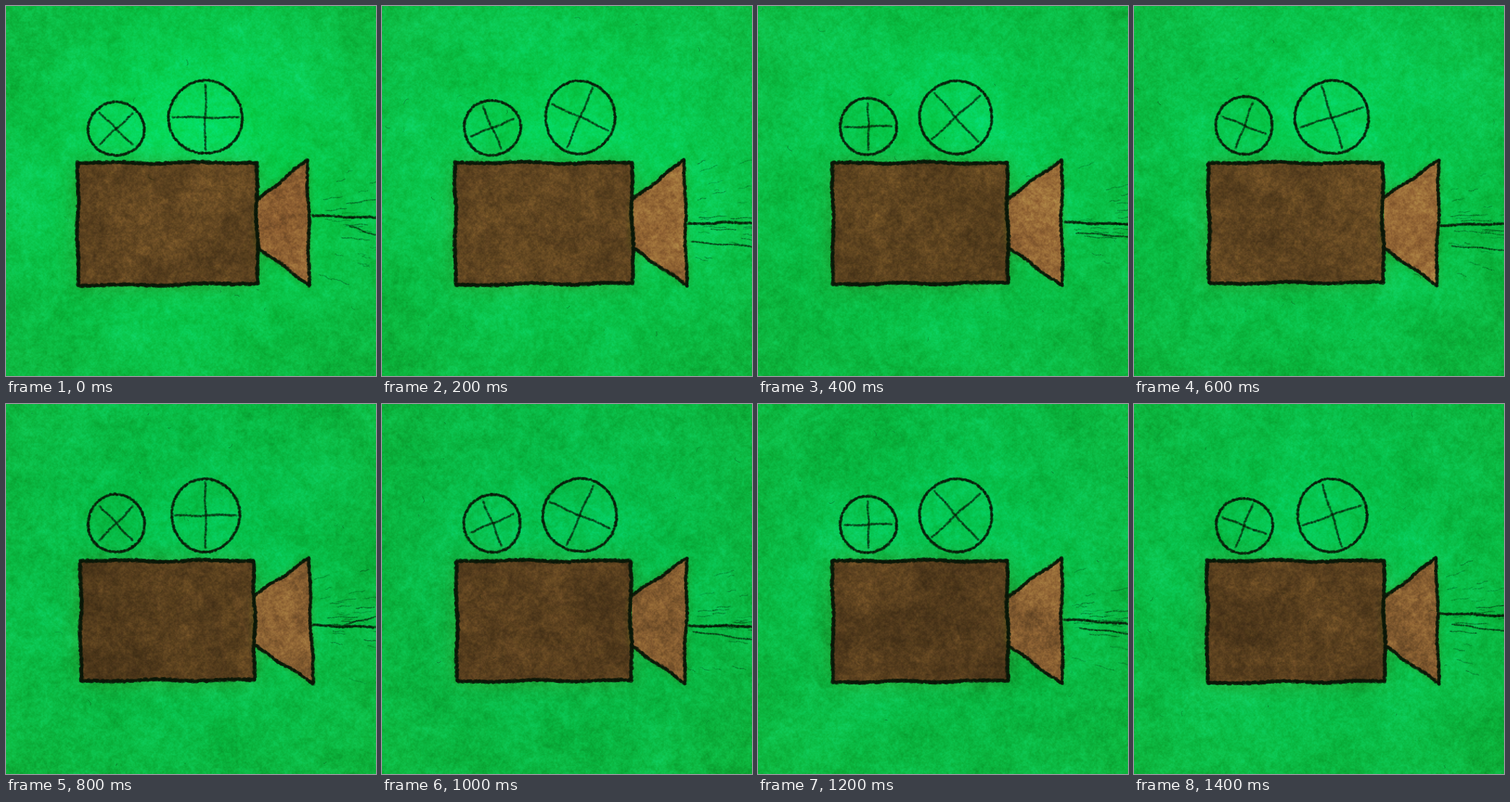
An HTML page with a canvas that plays this animation: 512x512 px, repeating every 1600 ms.

```html
<!DOCTYPE html>
<html lang="en">
<head>
<meta charset="utf-8">
<title>Hand-drawn film camera</title>
<style>
html, body { margin: 0; width: 100%; height: 100%; overflow: hidden; background: #0bbf55; }
canvas { display: block; width: 100vw; height: 100vh; }
</style>
</head>
<body>
<canvas id="stage" width="512" height="512"></canvas>
<script>
const SIZE = 512, HOLD = 200, POSES = 8;
const TAU = Math.PI * 2;
const INK = '11,24,9';
const screen = document.getElementById('stage').getContext('2d');

// Per pose: brightness of the green and of the cut-outs
const greens = [216, 210, 207, 206, 197, 192, 196, 199];
const glow = [1, .97, .98, 1, .88, .9, .9, .9];

// Per pose: main beam y from lens to edge, then a second beam as x, y, edge y
const beams = [
  [290, 293, 476, 305, 317],
  [301, 300, 428, 326, 333],
  [299, 302, 440, 314, 319],
  [304, 301, 440, 332, 338],
  [306, 309, 468, 306, 294],
  [307, 308, 430, 315, 326],
  [298, 304, 445, 310, 318],
  [290, 293, 440, 305, 314]
];

// Five drawings, played forward and back
function drawing(s) {
  const left = 99 + Math.min(s * 2, 4), low = Math.min(s, 3);
  const tipTop = [417, 418, 420, 422, 419][s], tipEnd = [420, 422, 421, 419, 425][s];
  return {
    body: [left, 217, 347 - s, 217, 348 - s, 384 - s * .6, left + 1, 387 - s],
    lens: [348 - s * .7, 268 - s, tipTop, 213, tipEnd, 387, 348 - s * .9, 334],
    small: [152.5, 170 - low * 1.6, 39, 37 + low],
    large: [[276, 274, 274, 274, 276][s], 154, [51, 48, 50, 51, 47][s], 50.5]
  };
}

function seeded(seed) {
  let s = seed * 7919 + 17 | 0;
  return () => {
    s = s + 0x6D2B79F5 | 0;
    let t = Math.imul(s ^ s >>> 15, 1 | s);
    t = t + Math.imul(t ^ t >>> 7, 61 | t) ^ t;
    return ((t ^ t >>> 14) >>> 0) / 4294967296;
  };
}

function newCanvas(n) {
  const c = document.createElement('canvas');
  c.width = c.height = n;
  return c;
}

const rgb = (c, k = 1) => `rgb(${c.map(v => Math.round(v * k)).join()})`;

function grain(ctx, rnd, cell) {
  const n = Math.ceil(SIZE / cell) + 2, tile = newCanvas(n), t = tile.getContext('2d');
  const img = t.createImageData(n, n);
  for (let i = 0; i < img.data.length; i += 4) {
    img.data.fill(rnd() * 256, i, i + 3);
    img.data[i + 3] = 255;
  }
  t.putImageData(img, 0, 0);
  ctx.save();
  ctx.globalAlpha = .11;
  ctx.globalCompositeOperation = 'overlay';
  ctx.imageSmoothingQuality = 'high';
  ctx.drawImage(tile, -cell, -cell, n * cell, n * cell);
  ctx.restore();
}

// Charcoal: overlapping dabs with a ragged edge along at(t), t from 0 to 1
function charcoal(ctx, rnd, at, length, width, alpha) {
  const steps = Math.ceil(length * 1.6);
  for (let i = 0; i <= steps; i++) {
    const [x, y] = at(i / steps);
    const r = width * (.26 + rnd() * .2), spread = width * .4;
    ctx.fillStyle = `rgba(${INK},${alpha * (.45 + rnd() * .55)})`;
    ctx.beginPath();
    ctx.arc(x + (rnd() - .5) * spread, y + (rnd() - .5) * spread, r, 0, TAU);
    ctx.fill();
  }
}

function line(ctx, rnd, x1, y1, x2, y2, width, alpha, bow = 1) {
  const dx = x2 - x1, dy = y2 - y1, length = Math.hypot(dx, dy);
  const phase = rnd() * TAU, waves = 5 + length / 30;
  const at = t => {
    const off = bow * Math.sin(phase + t * waves) * Math.sin(t * Math.PI);
    return [x1 + dx * t - dy / length * off, y1 + dy * t + dx / length * off];
  };
  charcoal(ctx, rnd, at, length, width, alpha);
}

function outline(ctx, rnd, p, sides, width) {
  for (let i = 0; i < sides * 2; i += 2)
    line(ctx, rnd, p[i], p[i + 1], p[(i + 2) % 8], p[(i + 3) % 8], width, .7, 1.4);
}

function polygon(ctx, p, fill, halo) {
  ctx.save();
  ctx.shadowColor = 'rgba(70,105,15,.55)';
  ctx.shadowBlur = halo;
  ctx.beginPath();
  for (let i = 0; i < p.length; i += 2) ctx.lineTo(p[i], p[i + 1]);
  ctx.fillStyle = fill;
  ctx.fill();
  ctx.restore();
}

function reel(ctx, rnd, [cx, cy, rx, ry], degrees, reach) {
  const phase = rnd() * TAU;
  const at = t => {
    const a = t * TAU, k = 1 + .012 * Math.sin(3 * a + phase);
    return [cx + rx * k * Math.cos(a), cy + ry * k * Math.sin(a)];
  };
  charcoal(ctx, rnd, at, Math.PI * (rx + ry), 4.6, .6);
  for (const turn of [0, 90]) {
    const a = (degrees + turn) * Math.PI / 180;
    const x = rx * reach * Math.cos(a), y = ry * reach * Math.sin(a);
    line(ctx, rnd, cx - x, cy - y, cx + x, cy + y, 4, .36);
  }
}

function paper(ctx, green) {
  const g = ctx.createRadialGradient(256, 215, 60, 256, 240, 370);
  g.addColorStop(0, rgb([5, green, green * .41]));
  g.addColorStop(1, rgb([13, 179, 61]));
  ctx.fillStyle = g;
  ctx.fillRect(0, 0, SIZE, SIZE);
}

function fibres(ctx, rnd) {
  for (let i = 0; i < 26; i++) {
    const x = rnd() * SIZE, y = rnd() * SIZE, a = rnd() * TAU, n = 1 + rnd() * rnd() * 12;
    ctx.strokeStyle = `rgba(${INK},${.12 + rnd() * .25})`;
    ctx.beginPath();
    ctx.moveTo(x, y);
    ctx.quadraticCurveTo(x + n * Math.cos(a), y + n * Math.sin(a),
      x + n * Math.cos(a + .5), y + n * Math.sin(a + .5));
    ctx.stroke();
  }
}

function rays(ctx, rnd, [y1, y2, x, y3, y4]) {
  line(ctx, rnd, 424, y1, SIZE, y2, 4.6, .52);
  line(ctx, rnd, x, y3, SIZE, y4, 3, .4);
  // Fainter dashes fan out from inside the camera, denser near the axis
  for (let i = 0; i < 25; i++) {
    const near = i < 5, a = (rnd() + rnd() - 1) * (near ? .14 : .46);
    const r = 185 + rnd() * 75, n = (near ? 25 : 8) + rnd() * 20;
    const px = 250 + r * Math.cos(a), py = 301 + r * Math.sin(a);
    line(ctx, rnd, px, py, px + n * Math.cos(a), py + n * Math.sin(a), 2, (near ? .25 : .1) + rnd() * .14);
  }
}

function paint(pose) {
  const canvas = newCanvas(SIZE), ctx = canvas.getContext('2d');
  const step = Math.min(pose, POSES - pose), quarter = pose % 4;
  const rnd = seeded(pose + 1), hand = seeded(step + 40);
  const { body, lens, small, large } = drawing(step);

  paper(ctx, greens[pose]);
  polygon(ctx, body, rgb([95, 68, 32], glow[pose]), 34);
  polygon(ctx, lens, rgb([149, 104, 54], glow[pose]), 12);
  for (const cell of [70, 20, 7, 3, 1.5]) grain(ctx, rnd, cell);
  fibres(ctx, rnd);
  rays(ctx, rnd, beams[pose]);

  outline(ctx, hand, body, 4, 6);
  outline(ctx, hand, lens, 3, 5.4);
  reel(ctx, hand, small, 45 + 22 * quarter, .84);
  reel(ctx, hand, large, 24 * quarter, .9);
  return canvas;
}

const painted = Array.from({ length: POSES }, (_, pose) => paint(pose));
const start = performance.now();
let shown = -1;

function tick() {
  const pose = Math.floor((performance.now() - start) / HOLD) % POSES;
  if (pose !== shown) {
    screen.drawImage(painted[pose], 0, 0);
    shown = pose;
  }
  requestAnimationFrame(tick);
}
tick();
</script>
</body>
</html>
```
